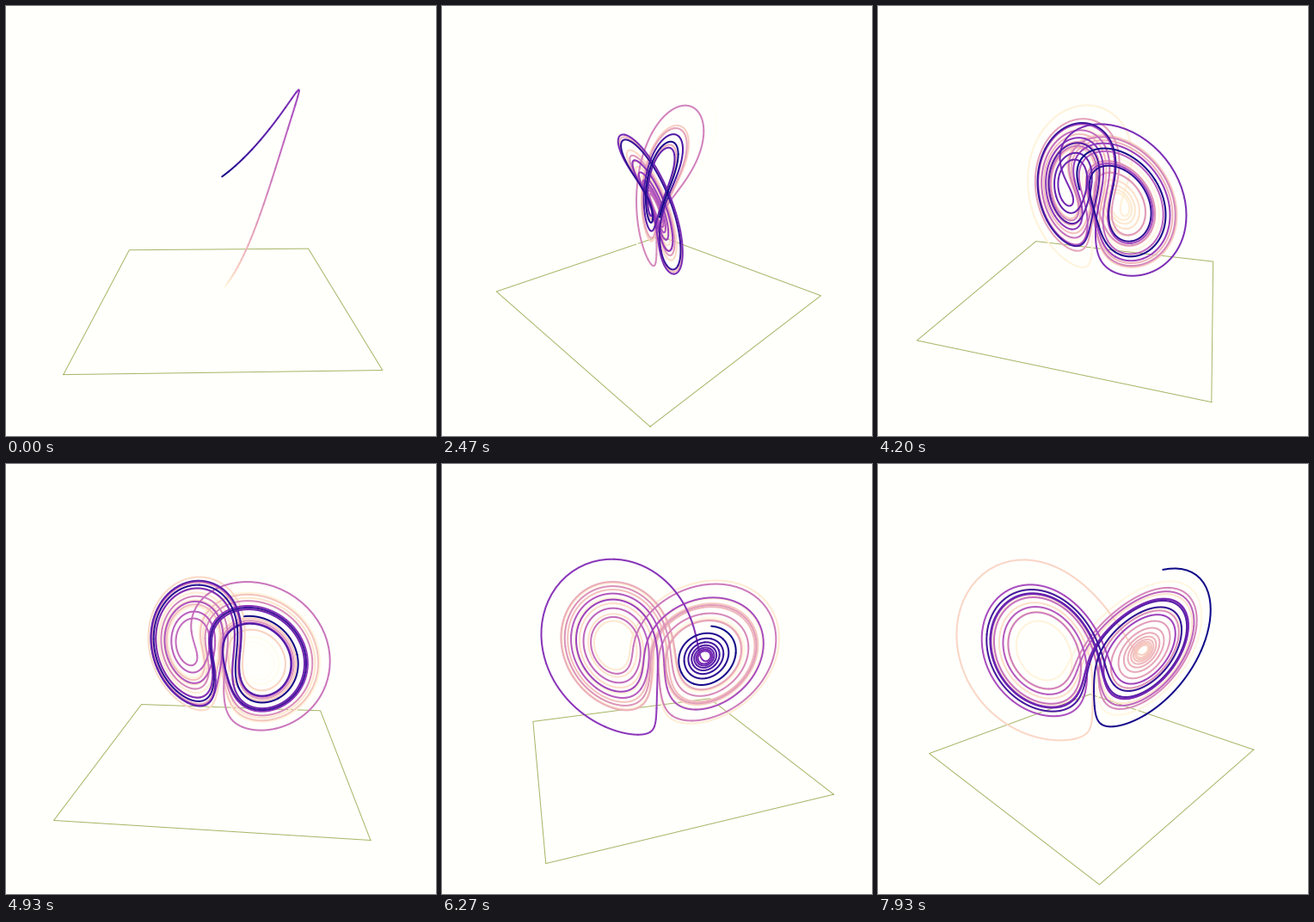
A matplotlib script for the animation above (8 s loop, 500 by 500 pixels).

```python
import numpy as np
import matplotlib.pyplot as plt
from matplotlib.animation import FuncAnimation
from matplotlib.collections import LineCollection

SIZE = 500
FRAMES = 120
STEPS = 100          # integration steps per frame
DT = 0.005
TRAIL = 5000         # longest trail, in steps
CHUNK = 20           # steps drawn in one colour
SPIN = 0.02          # radians per frame
RADIUS, HEIGHT, TARGET = 90, 50, 20
FOCAL = 0.9 * SIZE
PAPER = np.array([1, 1, 0.988])


def lorenz(count, sigma=10.0, rho=28.0, beta=8.0 / 3.0):
    x, y, z = 1.0, 1.0, 1.0
    path = [(x, y, z)]
    for _ in range(count):
        dx = sigma * (y - x)
        dy = x * (rho - z) - y
        dz = x * y - beta * z
        x += dx * DT
        y += dy * DT
        z += dz * DT
        path.append((x, y, z))
    return np.array(path)


def project(points, angle):
    x, y, z = points.T
    c, s = np.cos(angle), np.sin(angle)
    across, away, up = x * c - y * s, x * s + y * c, z - TARGET
    drop = HEIGHT - TARGET
    dist = np.hypot(RADIUS, drop)
    cp, sp = RADIUS / dist, drop / dist
    scale = FOCAL / (dist + away * cp - up * sp)
    return np.column_stack([SIZE / 2 + across * scale,
                            SIZE / 2 - (away * sp + up * cp) * scale])


def trail_colors(age):
    rgb = plt.get_cmap("plasma")(age)[:, :3]
    alpha = (1 - age)[:, None]
    return PAPER + (rgb - PAPER) * alpha


PATH = lorenz(FRAMES * STEPS)
FLOOR = 30 * np.array([(-1, -1, 0), (1, -1, 0), (1, 1, 0), (-1, 1, 0), (-1, -1, 0)])

fig = plt.figure(figsize=(SIZE / 100, SIZE / 100), dpi=100, facecolor=PAPER)
ax = fig.add_axes([0, 0, 1, 1])
ax.set(xlim=(0, SIZE), ylim=(SIZE, 0))
ax.axis("off")
floor, = ax.plot([], [], color="#a9b565", lw=0.72)
trail = LineCollection([], linewidths=1.44, capstyle="round", joinstyle="round")
ax.add_collection(trail)


def draw(i):
    n = i + 1
    angle = SPIN * n
    floor.set_data(*project(FLOOR, angle).T)
    head = n * STEPS
    start = max(0, head - TRAIL)
    pts = project(PATH[start:head + 1], angle)
    size = CHUNK if head > 1000 else 2
    cuts = np.arange(0, len(pts) - 1, size)
    trail.set_segments([pts[k:k + size + 1] for k in cuts])
    trail.set_color(trail_colors(1 - (cuts + size / 2) / (len(pts) - 1)))
    return floor, trail


anim = FuncAnimation(fig, draw, frames=FRAMES, interval=8000 / FRAMES,
                     repeat=True, repeat_delay=0)
plt.show()
```
